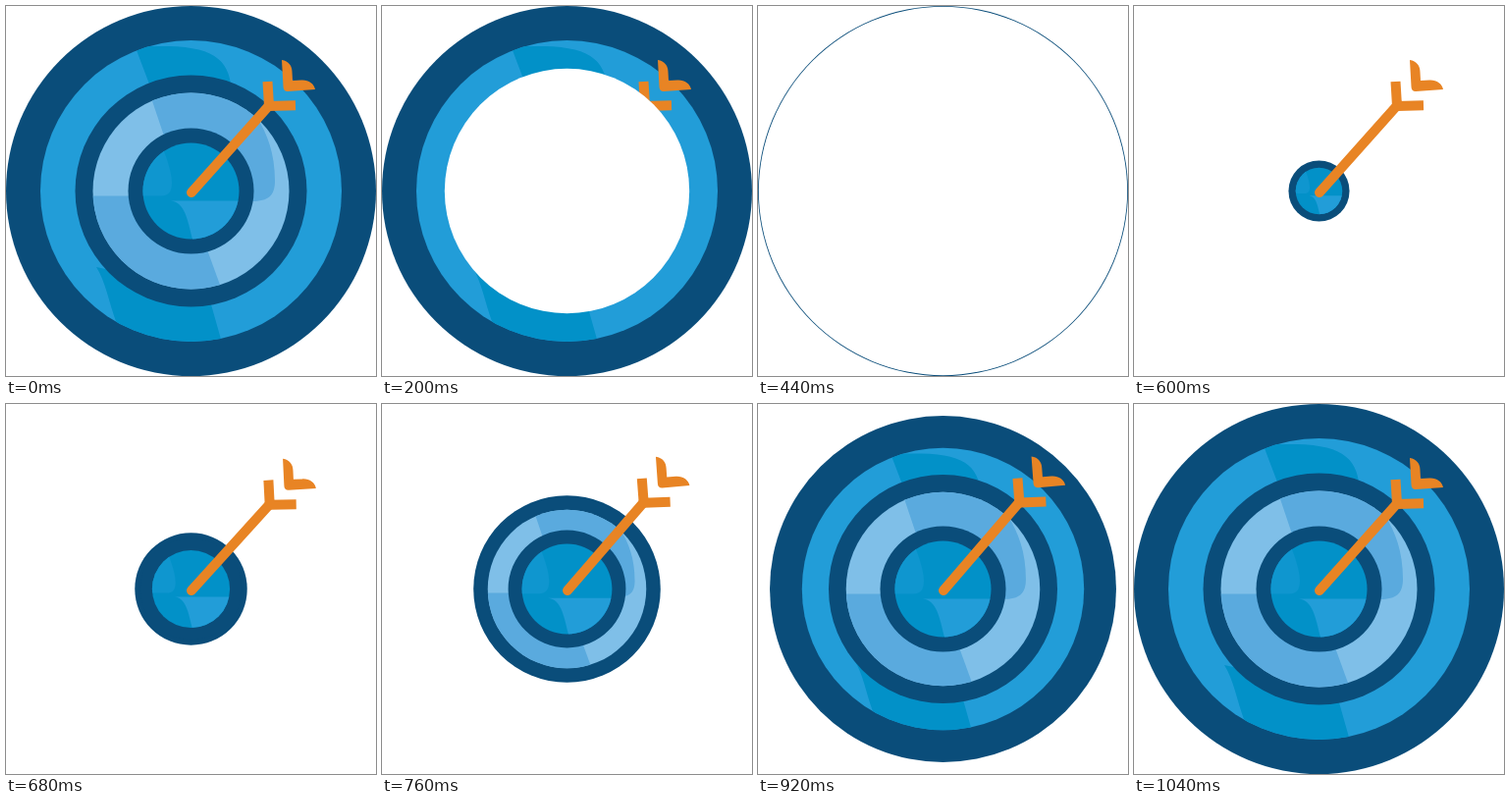
These frames come from a looping animation (377x377 px, 1560 ms). An HTML page:

```html
<!DOCTYPE html>
<html lang="en">
<head>
<meta charset="utf-8">
<title>Target</title>
<style>
  html, body { margin: 0; width: 100%; height: 100%; overflow: hidden; background: #fff; }
  svg { display: block; width: 100vw; height: 100vh; }
</style>
</head>
<body>
<svg viewBox="0 0 377 377">
  <defs>
    <clipPath id="outerClip"><circle cx="188.5" cy="188.5" r="153.5"/></clipPath>
    <clipPath id="middleClip"><circle cx="188.5" cy="188.5" r="100"/></clipPath>
    <clipPath id="innerClip"><circle cx="188.5" cy="188.5" r="49"/></clipPath>
  </defs>

  <g class="ring">
    <circle cx="188.5" cy="188.5" r="188.5" fill="#0a4d7a"/>
    <g clip-path="url(#outerClip)">
      <rect width="377" height="377" fill="#229dd8"/>
      <g fill="#0291c8">
        <path d="M128 32L150 90H230C229 58 216 42 165 41L131 41Z"/>
        <path d="M92 266C102 282 104 300 113 324L120 350H222L205 290Z"/>
      </g>
    </g>
  </g>

  <g class="ring">
    <circle cx="188.5" cy="188.5" r="118" fill="#0a4d7a"/>
    <g clip-path="url(#middleClip)">
      <rect width="377" height="377" fill="#7fbfe8"/>
      <g fill="#5aaade">
        <path d="M145 85L172 165V199H250C268 199 274 193 274 178C274 150 266 130 256 114L240 80Z"/>
        <path d="M80 193.5H185L222 295H80Z"/>
      </g>
    </g>
  </g>

  <g class="ring">
    <circle cx="188.5" cy="188.5" r="64" fill="#0a4d7a"/>
    <g clip-path="url(#innerClip)">
      <rect width="377" height="377" fill="#0291c8"/>
      <path d="M130 130H154C160 146 169 166 169 180C169 190 165 193.5 158 193.5H130Z" fill="#0f96cf"/>
      <path d="M168 198.5H245V245H192C186 224 184 200 168 198.5Z" fill="#229dd8"/>
    </g>
  </g>

  <g id="arrow" fill="none" stroke="#e88424" stroke-width="10">
    <path d="M189 190L267.5 102" stroke-linecap="round"/>
    <path d="M266.5 77L268 102L295 101.3" stroke-linejoin="round"/>
    <path d="M281 55C288 56 291.5 61 291.5 67L292 76L301 75.5C308 75 314 79 315 85L287 87Q282.5 87 282.5 82Z" fill="#e88424" stroke="none"/>
  </g>

  <circle id="wipe" cx="188.5" cy="188.5" r="0" fill="#fff"/>
</svg>
<script>
  const LOOP = 1560, STEP = 40, WIPE_END = 480, HIT = 590;
  const rings = [...document.querySelectorAll('.ring')].reverse();
  const arrow = document.getElementById('arrow');
  const wipe = document.getElementById('wipe');
  const clamp = x => Math.min(1, Math.max(0, x));

  // Exponential ease-out, normalised to land on 1
  const settle = p => (1 - Math.exp(-3.864 * p)) / (1 - Math.exp(-3.864));

  function draw(t) {
    const wiping = t < WIPE_END;
    wipe.setAttribute('r', wiping ? 189 * (1 - (1 - t / WIPE_END) ** 2) : 0);

    // Rings pop out from the innermost, 80 ms apart
    rings.forEach((ring, i) => {
      const scale = wiping ? 1 : settle(clamp((t - 544 - 80 * i) / 336));
      ring.setAttribute('display', scale > 0 ? 'inline' : 'none');
      ring.setAttribute('transform',
        `translate(188.5 188.5) scale(${scale}) translate(-188.5 -188.5)`);
    });

    // The arrow flies in, then quivers around its tip
    const away = wiping ? 0 : 285 * clamp((HIT - t) / (HIT - WIPE_END));
    const since = t - 600;
    const quiver = since > 0 && since < 440
      ? 2.3 * (1 - (since / 440) ** 3) * Math.sin(since / 171 * 2 * Math.PI) : 0;
    arrow.setAttribute('transform',
      `translate(${away * 0.666} ${-away * 0.746}) rotate(${quiver} 189 190)`);
  }

  const start = performance.now();
  function tick() {
    const t = (performance.now() - start) % LOOP;
    draw(Math.floor(t / STEP) * STEP);
    requestAnimationFrame(tick);
  }
  tick();
</script>
</body>
</html>
```
